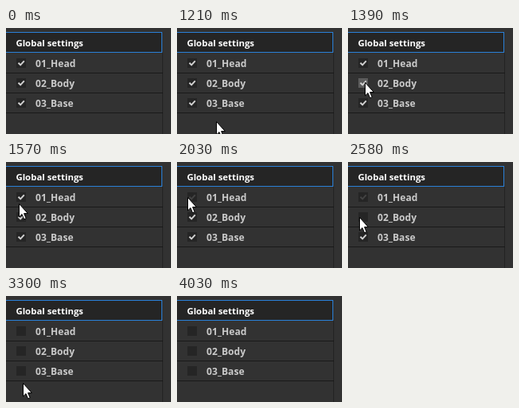
Write an HTML page that moves like this. It is 207x133 px and loops after 4650 ms.

```html
<!DOCTYPE html>
<html lang="en">
<head>
<meta charset="utf-8">
<title>Layer checkboxes</title>
<style>
  html, body { margin: 0; width: 100%; height: 100%; overflow: hidden; background: #323232; }
  svg { display: block; width: 100%; height: 100%; }
  text { font: bold 12px "Open Sans", "Noto Sans", sans-serif; letter-spacing: .1px; fill: #cacaca; }
  .title { font-size: 11.4px; letter-spacing: 0; fill: #fff; }
  .check { fill: none; stroke-width: 2; }
</style>
</head>
<body>
<svg viewBox="0 0 207 133">
  <rect width="207" height="133" fill="#323232"/>
  <rect x="196" y="31" width="1" height="102" fill="#222"/>
  <rect x="-.5" y="5.5" width="196" height="25" fill="#252525" stroke="#2a80d8"/>
  <text class="title" x="12.4" y="23">Global settings</text>
  <g id="rows"></g>
  <path id="cursor" d="M.5 .5V17L4 13.6L6.6 19.8L9.2 18.7L6.6 12.6H11.4Z" fill="#fff" stroke="#000"/>
</svg>
<script>
const LOOP = 4650;
const STEP = 90;
const ROW_HEIGHT = 25;

// Key points of the pointer tip; it is out of sight before the first and after the last
const path = [
  { at: 1210, x: 49, y: 117 },
  { at: 1390, x: 21, y: 68 },
  { at: 1660, x: 13, y: 44 },
  { at: 2310, x: 13, y: 44 },
  { at: 2580, x: 14, y: 69 },
  { at: 2850, x: 17, y: 97 },
  { at: 3120, x: 21, y: 109 },
  { at: 3670, x: 21, y: 109 },
  { at: 4030, x: 78, y: 137 }
];

// Each check turns dim at "off" and disappears at "gone"
const rows = [
  { label: "01_Head", off: 2030, gone: 3300 },
  { label: "02_Body", off: 2580, gone: 2580 },
  { label: "03_Base", off: 2760, gone: 2760 }
];

const group = document.getElementById("rows");
const cursor = document.getElementById("cursor");

group.innerHTML = rows.map(({ label }, i) => `
  <g transform="translate(0 ${ROW_HEIGHT * i})">
    <rect y="56" width="197" height="1" fill="#191919"/>
    <rect class="box" x="13" y="38" width="12" height="12"/>
    <path class="check" d="M15.5 43.7L18.2 46.4L22.8 41.4"/>
    <text x="37" y="49">${label}</text>
  </g>`).join("");

rows.forEach((row, i) => {
  row.box = group.children[i].querySelector(".box");
  row.check = group.children[i].querySelector(".check");
});

// Moves in a straight line between key points, in jumps of one step
function pointerAt(t) {
  const next = path.findIndex(({ at }) => at > t);
  if (next < 1) return { x: -50, y: -50 };
  const from = path[next - 1], to = path[next];
  const elapsed = Math.floor((t - from.at) / STEP) * STEP;
  const progress = elapsed / (to.at - from.at);
  const mix = (a, b) => Math.round(a + (b - a) * progress);
  return { x: mix(from.x, to.x), y: mix(from.y, to.y) };
}

function draw(t) {
  const { x, y } = pointerAt(t);
  cursor.setAttribute("transform", `translate(${x} ${y})`);
  rows.forEach(({ box, check, off, gone }, i) => {
    const top = 38 + ROW_HEIGHT * i;
    const hover = t < off && x >= 13 && x < 25 && y >= top && y < top + 12;
    box.style.fill = hover ? "#5c5c5c" : "#252525";
    check.style.stroke = t < off ? "#d0d0d0" : "#434343";
    check.style.display = t < gone ? "" : "none";
  });
}

const begin = performance.now();
function tick() {
  draw((performance.now() - begin) % LOOP);
  requestAnimationFrame(tick);
}
tick();
</script>
</body>
</html>
```
